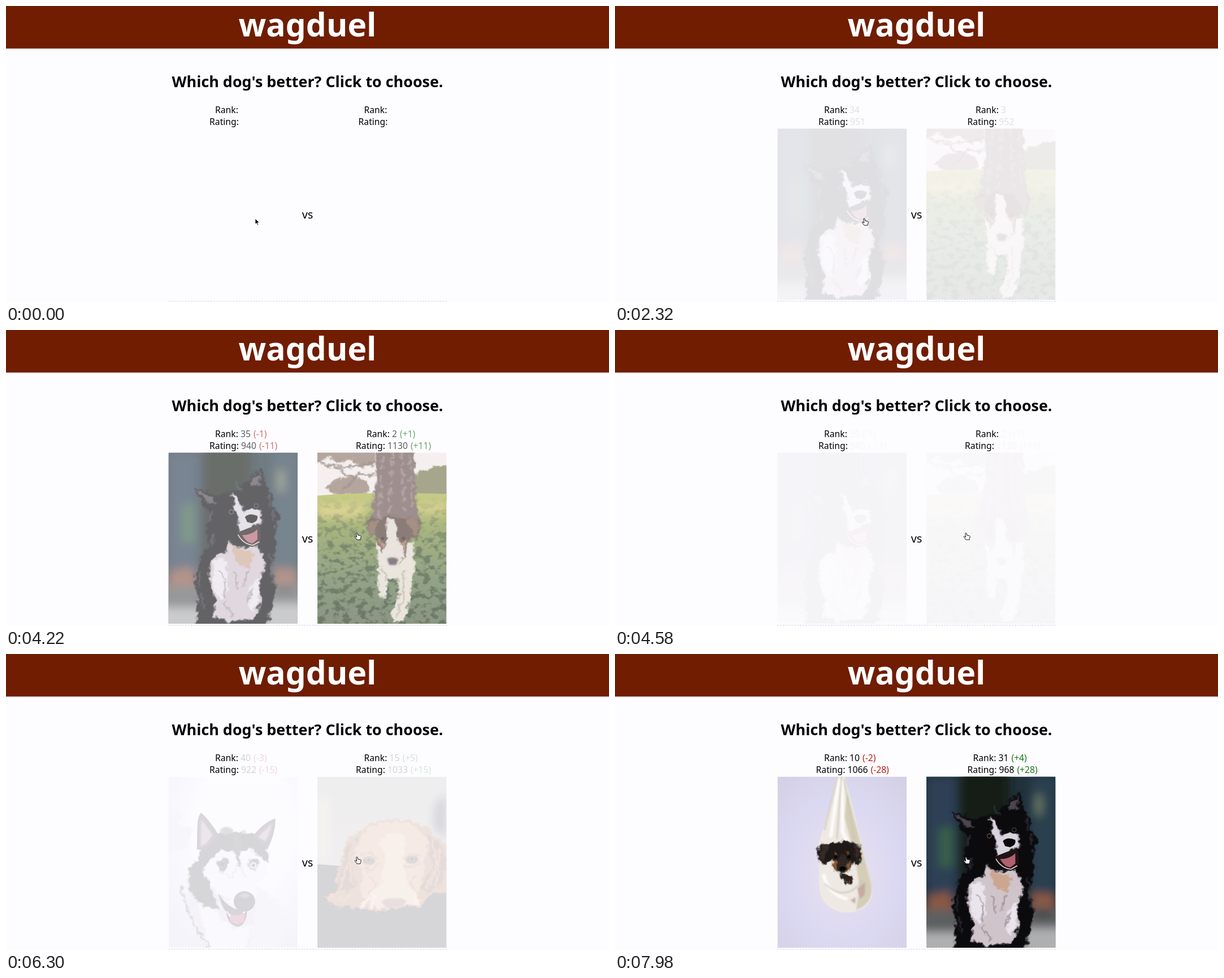
These frames come from a looping animation (1067 by 525 pixels, 8 s). An HTML page:

```html
<!DOCTYPE html>
<html lang="en">
<meta charset="utf-8">
<title>wagduel</title>
<style>
  html, body { margin: 0; width: 100%; height: 100%; overflow: hidden; background: #fdfcff }
  body > svg { display: block }
  text { font-family: "Noto Sans", "Open Sans", sans-serif; text-anchor: middle; white-space: pre }
  .info { font-size: 15.7px }
  .delta { text-anchor: start }
  .bold { font-weight: 700 }
  .blur { filter: url(#blur) }
  .soft { filter: url(#soft) }
  .fur { filter: url(#fur) }
  .line { fill: none; stroke-linecap: round; stroke-linejoin: round }
</style>
<svg id="stage" width="1067" height="525" viewBox="0 0 1067 525">
  <defs>
    <filter id="blur" x="-50%" y="-50%" width="200%" height="200%"><feGaussianBlur stdDeviation="8"/></filter>
    <filter id="soft" x="-20%" y="-20%" width="140%" height="140%"><feGaussianBlur stdDeviation="1.5"/></filter>
    <filter id="fur" color-interpolation-filters="sRGB">
      <feGaussianBlur in="SourceGraphic" stdDeviation=".8" result="shape"/>
      <feTurbulence type="fractalNoise" baseFrequency=".09" numOctaves="3" seed="4"/>
      <feDisplacementMap in="shape" scale="14" xChannelSelector="R" yChannelSelector="G"/>
    </filter>
    <filter id="leaves" x="0" y="0" width="100%" height="100%" color-interpolation-filters="sRGB">
      <feTurbulence type="fractalNoise" baseFrequency=".07 .1" numOctaves="3" seed="9"/>
      <feColorMatrix values="0 0 0 0 .09  0 0 0 0 .19  0 0 0 0 .06  6 0 0 0 -2.9"/>
      <feComposite in2="SourceGraphic" operator="in"/>
    </filter>
    <linearGradient id="wall"><stop stop-color="#dedad6"/><stop offset=".6" stop-color="#dddbee"/><stop offset="1" stop-color="#d9d6e2"/></linearGradient>
    <linearGradient id="table" x2="0" y2="1"><stop stop-color="#e6e3ec"/><stop offset="1" stop-color="#c9c2b2"/></linearGradient>
    <linearGradient id="grass" x2="0" y2="1"><stop stop-color="#a9b03f"/><stop offset=".3" stop-color="#748a36"/><stop offset=".65" stop-color="#577043"/><stop offset="1" stop-color="#4a5c3c"/></linearGradient>
    <linearGradient id="shade" x2="0" y2="1"><stop stop-color="#fff" stop-opacity="0"/><stop offset=".4" stop-color="#fff" stop-opacity=".7"/><stop offset="1" stop-color="#fff"/></linearGradient>
    <radialGradient id="snow" cx=".58" cy=".3" r=".75"><stop offset=".5" stop-color="#fcfcff"/><stop offset=".72" stop-color="#e6e6fa"/><stop offset="1" stop-color="#d2d2ea"/></radialGradient>
    <linearGradient id="room" x2="0" y2="1"><stop stop-color="#aaa9a4"/><stop offset="1" stop-color="#c0b3a8"/></linearGradient>
    <radialGradient id="studio" cy=".55" r=".7"><stop stop-color="#eae2ee"/><stop offset=".6" stop-color="#dbd8f2"/><stop offset="1" stop-color="#d4d1e6"/></radialGradient>

    <g id="pug">
      <path fill="url(#wall)" d="M0 0H228V303H0Z"/>
      <path class="line" stroke="#aaa795" stroke-width="3" d="M0 14H38V0"/>
      <path fill="#f3f1f8" d="M156 0h4V30h-4Z"/>
      <path class="soft" fill="#efedfb" d="M148 128 228 125V215H160Z"/>
      <path class="soft" fill="#b9aab8" d="M228 74Q215 95 215 124L228 125Z"/>
      <path fill="#17130f" d="M88 146Q90 130 106 128Q128 123 150 128Q170 130 180 142Q192 158 189 168L178 172Q184 190 201 207L104 196Q102 172 108 158L97 160Q94 150 88 146Z"/>
      <path class="soft" fill="#0a0807" d="M92 146 108 130 113 140 99 158ZM172 138 188 166 177 170 166 150Z"/>
      <ellipse class="soft" cx="138" cy="172" rx="17" ry="13" fill="#2f2722"/>
      <path class="line" stroke="#60554c" stroke-width="1.5" d="M120 183Q125 172 138 171Q152 172 156 183M129 143Q137 147 146 143"/>
      <path fill="#080706" d="M130 160Q138 156 146 160L140 167H135Z"/>
      <g fill="#4d4d61"><circle cx="119" cy="155" r="6"/><circle cx="157" cy="159" r="6"/></g>
      <g fill="#0a0909"><circle cx="119" cy="156" r="4"/><circle cx="157" cy="160" r="4"/></g>
      <g fill="#c3c4dc"><circle cx="117" cy="153" r="2"/><circle cx="155" cy="157" r="2"/></g>
      <path fill="url(#table)" d="M0 190Q110 190 228 212V303H0Z"/>
      <path class="blur" fill="#aaa18d" d="M0 285Q80 290 108 240Q106 295 30 303H0Z"/>
      <path fill="#3a1c0e" d="M0 197Q75 185 102 230L100 254Q84 288 20 291L0 289Z"/>
      <path fill="#a4602f" d="M0 196Q75 185 101 229Q100 266 30 272L0 268Z"/>
      <path fill="#e3bb8c" d="M0 200Q68 190 93 228Q90 258 30 264L0 260Z"/>
      <g class="line fur" stroke-width="13" stroke-dasharray="0 17">
        <path stroke="#f4ebdc" d="M8 212Q50 195 82 224T12 252M8 230H65"/>
        <path stroke="#d99358" stroke-width="7" d="M16 207Q58 200 80 234T8 244M20 222H68"/>
        <path stroke="#fff9f0" stroke-width="8" d="M5 223Q45 206 72 242M2 260H60"/>
      </g>
      <path fill="#83503d" d="M0 200 14 201 10 217 0 214Z"/>
    </g>

    <g id="wolf">
      <path fill="#f7f6ff" d="M0 0H228V303H0Z"/>
      <path class="soft" fill="#d3cfc9" d="M0 0H84L68 46 30 64H0Z"/>
      <path class="soft" fill="#c2a19a" d="M0 29 36 34 40 58 0 64Z"/>
      <path class="soft" fill="#d8d8ee" d="M145 49H228V57H145ZM0 207Q80 190 228 224V265Q110 235 0 250Z"/>
      <g class="fur">
        <path fill="#c2b9b1" d="M90 32 70 57 55 70 60 82 42 95 48 108 39 126 50 138 40 160 46 182 70 200H125V70Z"/>
        <path fill="#6c625d" d="M107 16 124 36Q140 31 160 24L153 52Q157 82 176 116Q179 127 166 134L142 137Q178 147 190 175L199 186 206 209 190 213 184 226 160 232 130 238 96 225 62 210 42 198 46 166 55 132 49 112 64 98 58 84 76 74 80 49Z"/>
        <path fill="#343032" d="M107 18 118 42 102 64 89 70 87 50ZM158 27 149 50 135 42ZM95 72 115 56 110 98 91 133 83 169 102 201 78 212 46 194 55 142 75 116ZM145 145 164 154 181 186 171 220 153 183Z"/>
        <path fill="#969096" d="M116 52Q134 45 149 65L154 82Q164 103 176 117L170 133 140 137Q113 118 106 82Z"/>
        <path fill="#cfc9cc" d="M112 102Q131 120 166 128L157 137 135 139 109 125Z"/>
        <path class="line" stroke="#575158" stroke-width="4" d="M120 63Q135 57 151 78M148 112Q161 121 173 122M96 148 123 161 116 193M139 159 148 182M64 185 89 200"/>
        <path class="line" stroke="#b4aaa5" stroke-width="4" d="M74 82 61 110 72 131M84 87 75 110M115 205 126 180M134 211 153 202M176 190 188 206"/>
        <path class="line" stroke="#862d36" stroke-width="4" stroke-dasharray="3 2" d="M63 163Q75 162 86 156"/>
        <path fill="#e2dde4" d="M51 213Q77 204 91 216L82 259 59 264 44 245ZM99 208Q128 190 148 209L142 235 115 238Z"/>
        <path fill="#f6f5ff" d="M-9 242 34 237 55 252 95 233 129 242 184 227 238 233V313H-9Z"/>
        <path class="line" stroke="#c1bdca" stroke-width="4" d="M57 245 64 258M76 237 72 260M112 224 125 236M14 213 44 226"/>
      </g>
      <path fill="#171417" d="M124 86Q131 80 138 88L130 91ZM164 121Q175 113 177 122Q174 130 166 129Z"/>
    </g>

    <g id="collie">
      <path fill="#20323b" d="M0 0H228V303H0Z"/>
      <g class="blur">
        <path fill="#2d4054" d="M0 0H52V230H0Z"/><path fill="#171c13" d="M60 -20H146V210H60Z"/>
        <path fill="#2c4150" d="M184 0H228V230H184Z"/><path fill="#38604a" d="M23 90H47V160H23Z"/><path fill="#6c7a62" d="M192 32H204V68H192Z"/>
        <path fill="#5d5f60" d="M-20 232H250V320H-20Z"/><path fill="#8b5944" d="M0 212 40 203 52 235H0ZM184 205 228 208V232H184Z"/>
        <path fill="#aeb0b0" d="M-20 275H60L75 320H-20ZM170 268H250V320H170Z"/><path fill="#27292a" d="M190 238H222V246H190Z"/>
      </g>
      <g class="fur">
        <path fill="#0b0b0e" d="M45 62Q68 66 84 77Q104 64 122 70Q128 54 140 50L163 26Q172 42 171 62Q186 72 184 92L197 111 188 132Q194 165 182 204L190 240 172 313H48L53 261 45 231Q50 188 72 165L66 137 76 112 64 95Z"/>
        <path fill="#4c454e" d="M50 66 78 78 84 90 68 88ZM160 33 164 54 150 60 144 54Z"/>
        <path class="line" stroke="#3a3b49" stroke-width="2" d="M119 54 129 68M77 104 72 122M177 74 181 96M188 102 184 119M80 143 76 165M58 208 53 234M179 180 185 230M58 250 61 277"/>
        <path fill="#d9d4de" d="M110 73Q121 75 126 90L133 105 Q146 97 158 103L166 113 164 127 144 134 132 145Q121 134 123 116Z"/>
        <path fill="#d0c4cb" d="M110 157Q118 170 128 166L158 166Q172 180 167 211L160 233 164 261 150 294 104 299 79 290 83 263 76 238 70 207Q80 176 100 178Z"/>
        <path fill="#e9e4ee" d="M80 188 102 190 106 240 92 262 78 231ZM141 240 159 224 159 269 145 283Z"/>
        <path fill="#cba792" d="M114 164 152 178 142 205 116 192Z"/>
        <path class="line" stroke="#8d7b80" stroke-width="2" d="M89 207 100 229 99 259M115 212 122 240M141 210 132 235M98 266 114 290M148 240 139 265"/>
      </g>
      <path fill="#201315" d="M120 142 140 134 160 127Q166 146 161 161L149 167Q131 165 120 142Z"/>
      <path fill="#b0606f" d="M130 146Q147 146 157 136L157 154 148 161Q138 160 130 146Z"/>
      <path class="line" stroke="#e9dfde" stroke-width="1.5" d="M123 146Q132 162 149 164L160 158"/>
      <path fill="#08080b" d="M135 114Q143 106 157 112Q159 121 148 125L139 123Z"/>
      <g fill="#5e4d40"><circle cx="111" cy="105" r="4.5"/><circle cx="155" cy="94" r="4"/></g>
      <g fill="#050507"><circle cx="111" cy="105" r="3"/><circle cx="155" cy="94" r="3"/></g>
    </g>

    <g id="puppy">
      <path fill="#f1eae6" d="M0 0H228V303H0Z"/>
      <g class="fur">
        <path fill="#8b7566" d="M-9 -9H104V20L80 28 62 12 36 20 19 8 -9 20ZM14 62 38 46 62 40 86 50 94 68 60 74 30 76Z"/>
        <path class="line" stroke="#705b50" stroke-width="3" d="M0 16Q50 34 104 15M30 24 67 46M43 67 75 38 100 39"/>
        <path fill="#75754c" d="M171 38 196 27 238 22V85H171Z"/>
      </g>
      <path fill="url(#grass)" d="M0 76Q80 69 228 73V303H0Z"/>
      <path class="blur" fill="#cabd57" d="M0 90H90L76 114H0ZM172 90H228V106H180Z"/>
      <mask id="depth"><path fill="url(#shade)" d="M0 76H228V303H0Z"/></mask>
      <g mask="url(#depth)"><path filter="url(#leaves)" d="M0 76H228V303H0Z"/></g>
      <g class="fur">
        <path fill="#65504c" d="M107 -9H171L174 74 180 123H95L101 64Z"/>
        <path class="line" stroke="#8b7170" stroke-width="5" stroke-dasharray="9 8 4 11" d="M115 8 108 118M133 0 127 109M148 0 154 111M164 9 168 102"/>
        <path fill="#e0dacb" d="M105 160 168 160Q173 190 168 225L165 250 153 297 134 300 129 288 144 252 142 222 124 226 122 256 109 255 108 222Z"/>
        <path class="line" stroke="#a99c86" stroke-width="3" d="M114 205 121 225M153 210 150 259 141 288"/>
        <path fill="#49332b" d="M112 117Q91 107 85 127L92 149 104 144 108 160 119 188 130 201 146 199 157 180 164 145 173 156 184 127Q176 107 154 116Q132 108 112 117Z"/>
        <path fill="#75503e" d="M110 117 101 143 92 146 87 126ZM157 116 172 150 181 128 173 114Z"/>
        <path fill="#e0d7cb" d="M122 117H138L138 142 147 164 154 182 142 203 124 202 113 184 122 160Z"/>
        <path fill="#a87050" d="M108 152 120 160 117 172ZM148 162 159 154 154 176Z"/>
      </g>
      <path class="soft" fill="#43363a" d="M123 188Q133 183 143 189L139 199H127Z"/>
      <g fill="#1d1412"><circle cx="115" cy="152" r="3"/><circle cx="152" cy="152" r="3"/></g>
    </g>

    <g id="husky">
      <path fill="url(#snow)" d="M0 0H228V303H0Z"/>
      <g class="fur">
        <path fill="#dedced" d="M-9 45 25 68 16 79 43 94 34 123 -9 145ZM155 193 190 218 207 252 188 313H137Z"/>
        <path fill="#cfccde" d="M46 150 32 188 36 218 20 193 32 239 48 263 60 313H144L148 259 157 216Z"/>
        <path fill="#19181b" d="M53 139Q62 108 90 101Q124 92 158 106Q178 122 176 152L157 150 145 129 125 130 124 159 99 165 84 162 72 181 76 204 92 236 70 232 48 218Q32 194 36 165Z"/>
        <path fill="#edecf8" d="M52 228 86 238 102 263 122 270 148 261 135 313H75Z"/>
        <path class="line" stroke="#3b393e" stroke-width="3" stroke-dasharray="22 5" d="M21 194 33 235 50 269 72 303"/>
      </g>
      <path fill="#28252a" d="M50 129 51 87Q52 68 58 64Q74 79 89 104L65 130ZM150 104Q170 80 189 74Q189 102 174 130Z"/>
      <path class="soft" fill="#a1838f" d="M58 76 78 103 67 118 57 124ZM183 83 177 102 171 114 158 107Z"/>
      <path class="soft" fill="#584c4a" d="M90 96Q101 82 116 96L102 104Z"/>
      <g class="fur">
        <path fill="#eeedf8" d="M72 150Q92 123 114 132L125 158 130 140Q142 125 157 136L173 153Q174 178 156 191L154 224 137 239 117 234 98 216 75 194 61 167Z"/>
        <path fill="#242125" d="M112 98H127L127 160 119 150ZM82 152Q94 139 106 146Q112 160 98 167Q86 166 82 152ZM142 150Q150 142 159 151Q159 167 148 168Q141 162 142 150Z"/>
        <path class="line" stroke="#6d666e" stroke-width="2" stroke-dasharray="1 4" d="M121 154 113 182M128 156 135 180M97 171 113 182M83 209 111 219M87 219 110 225"/>
      </g>
      <path fill="#211719" d="M88 205Q92 228 102 240Q104 262 123 266Q138 262 139 236L117 234Q98 226 88 205Z"/>
      <path fill="#a23a50" d="M105 242Q120 250 135 240L133 257 122 262 110 257Z"/>
      <path class="line" stroke="#fff" stroke-width="2" d="M103 239 109 247M132 241 136 238"/>
      <ellipse cx="134" cy="221" rx="19" ry="18" fill="#17181c"/><path class="soft" fill="#56545c" d="M124 211Q134 202 145 211L137 216Z"/>
      <circle cx="95" cy="155" r="5" fill="#59443c"/><circle cx="95" cy="155" r="4" fill="#08090c"/>
      <circle cx="150" cy="157" r="6" fill="#9cc4dd"/><circle cx="150" cy="157" r="2.5" fill="#08090c"/>
    </g>

    <g id="spaniel">
      <path fill="url(#room)" d="M0 0H228V303H0Z"/>
      <path class="blur" fill="#d5cfaa" d="M0 39H19V146H0Z"/><path class="blur" fill="#17203a" d="M228 28 207 50 204 87 228 112Z"/>
      <path fill="#181619" d="M0 155 49 159 70 196 189 210 228 183V303H0Z"/>
      <g class="fur">
        <path fill="#a8673a" d="M76 95Q102 72 142 76Q190 77 209 106L238 128V206L201 207 182 231 151 228 111 237 73 235 57 229 35 233 12 214 39 199 31 185 42 151 52 111Z"/>
        <path fill="#cf9360" d="M79 98Q105 79 139 80Q181 82 193 113L189 152 184 196 171 221 97 232 75 207 80 169 66 140Z"/>
        <path fill="#e1b78d" d="M127 99Q145 98 158 116L151 151 162 193 183 219 168 230 106 234 89 212 112 188 119 140 105 117Z"/>
        <path fill="#713f25" d="M76 108Q47 112 44 157L34 192 49 206 68 190 60 153ZM194 103Q225 116 226 148L222 188 191 206 179 197 203 163Z"/>
        <path class="line" stroke="#c07b45" stroke-width="4" d="M64 114 51 161 42 194M70 117 58 160 62 187M204 112 211 155 195 197M216 128 215 171 207 194M19 215 37 204M40 220 63 209"/>
        <path class="line" stroke="#9c623a" stroke-width="3" d="M77 140Q91 130 106 145M152 144Q166 132 182 143M82 162Q91 170 109 157M152 157Q169 167 182 151M93 177 103 187 93 208M172 174 164 191 175 209"/>
        <path class="line" stroke="#edcca6" stroke-width="5" d="M101 210 95 231M89 217 77 231M172 211 177 225"/>
      </g>
      <g class="soft" fill="#3b2419"><ellipse cx="91" cy="149" rx="11" ry="7"/><ellipse cx="167" cy="147" rx="11" ry="7"/></g>
      <g fill="#7d4d2e"><circle cx="91" cy="148" r="5"/><circle cx="167" cy="146" r="5"/></g>
      <g fill="#0d0b0c"><circle cx="91" cy="148" r="3"/><circle cx="167" cy="146" r="3"/></g>
      <path class="soft" fill="#8b524b" d="M113 222Q119 214 135 216Q153 213 157 222L148 231 122 233Z"/>
    </g>

    <g id="dachshund">
      <path fill="url(#studio)" d="M0 0H228V303H0Z"/>
      <path fill="#eee9e3" d="M104 0H119L136 65 151 129 166 190Q174 222 147 235Q112 250 86 226Q70 212 74 168L72 121 91 58Z"/>
      <path class="soft" fill="#d4cdb7" d="M123 27 150 130 166 192Q170 225 139 236L145 196 136 137 118 72Z"/>
      <path class="line soft" stroke="#fdfbfa" stroke-width="6" d="M109 5 94 105M114 9 115 98 125 118M82 175Q88 206 121 216"/>
      <path class="line soft" stroke="#cbc3b4" stroke-width="2" d="M106 0 83 94M113 0 105 110M118 6 137 119M84 190Q120 224 150 184"/>
      <path class="soft" fill="#c5aba3" d="M141 198 155 187 154 209 146 216ZM129 219 138 214 137 225Z"/>
      <g class="fur">
        <path fill="#1e1817" d="M91 119Q77 112 71 129Q70 150 82 155L94 145 100 165 113 173 128 164 134 152 141 159Q151 148 146 128Q140 111 127 117Q109 111 91 119Z"/>
        <path fill="#362a26" d="M80 117 90 121 82 149 74 145ZM136 116 144 126 142 153 134 140Z"/>
        <path fill="#8a5a36" d="M94 148 107 152 112 165 103 168ZM121 154 130 148 128 163 118 169ZM101 134 107 133 106 138ZM121 133 127 133 125 137Z"/>
        <path fill="#302622" d="M108 140H121L124 164 114 171 107 163Z"/>
        <path fill="#2b211d" d="M109 175Q123 167 134 181L131 191 119 190Z"/>
      </g>
      <g fill="#070606"><circle cx="103" cy="142" r="3"/><circle cx="126" cy="142" r="3"/><ellipse cx="115" cy="163" rx="6" ry="4"/></g>
      <path class="line" stroke="#7d634f" d="M121 185 122 189M127 184 128 189M132 182 132 187"/>
    </g>
  </defs>

  <path fill="#fdfcff" d="M0 0H1067V525H0Z"/>
  <path fill="#701d02" d="M0 0H1067V75.5H0Z"/>
  <text class="bold" x="533.5" y="54" font-size="57" fill="#fff">wagduel</text>
  <text class="bold" x="533.5" y="144" font-size="26.9">Which dog's better? Click to choose.</text>
  <text x="533.5" y="377" font-size="20">vs</text>
  <path stroke="#d9d8ec" stroke-dasharray="3 2" d="M287 523.5H780"/>
  <g id="sides"></g>
  <g id="cursor" stroke="#000" stroke-linejoin="round">
    <path id="arrow" stroke="#fff" stroke-width=".8" d="M0 0V10L2.3 7.9 4 11.7 5.7 11 4 7.3H7.2Z"/>
    <path id="hand" fill="#fff" stroke-width=".9" d="M-1.2 .5Q0-.8 1 .7L2 4.3Q3 3.3 4 4.7Q5 3.9 6 5.2Q7.2 4.8 7.3 6.5L6.5 9.5 6 12H0L-3.5 7.4Q-4.3 5.5-2.4 6L-.3 7.8Z"/>
  </g>
</svg>
<script>
const LOOP = 8000, FADE = 600, DELTA_FADE = 300;
const $ = id => document.getElementById(id);
const clamp = v => Math.max(0, Math.min(1, v));

// Each dog: photo, final rank, rank change, final rating, rating change.
const rounds = [
  { start: 40, click: 1040, leave: 1640, dogs: [['pug', 25, 6, 985, 21], ['wolf', 33, -5, 952, -21]] },
  { start: 2250, click: 3400, leave: 4000, dogs: [['collie', 35, -1, 940, -11], ['puppy', 2, 1, 1130, 11]] },
  { start: 4600, click: 5150, leave: 5800, dogs: [['husky', 40, -3, 922, -15], ['spaniel', 15, 5, 1033, 15]] },
  { start: 6400, click: 7450, leave: 8050, dogs: [['dachshund', 10, -2, 1066, -28], ['collie', 31, 4, 968, 28]] },
];

const row = (label, x, y) =>
  `<text class="info" x="${x}" y="${y}">${label}: <tspan></tspan></text><text class="info delta" y="${y}"></text>`;

const sides = [287.5, 551].map(x => {
  const group = document.createElementNS('http://www.w3.org/2000/svg', 'g');
  const center = x + 114;
  group.innerHTML = row('Rank', center, 190) + row('Rating', center, 211) +
    `<svg x="${x}" y="217.5" width="228.5" height="303.5" viewBox="0 0 228 303" preserveAspectRatio="none"><use/></svg>`;
  $('sides').append(group);
  const texts = group.querySelectorAll('text');
  return {
    center, photo: group.querySelector('svg'), use: group.querySelector('use'),
    rows: [[texts[0], texts[1]], [texts[2], texts[3]]],
  };
});

function drawRow([text, delta], center, value, change, opacity, deltaOpacity) {
  const number = text.querySelector('tspan');
  number.textContent = value;
  number.setAttribute('fill-opacity', opacity);
  delta.textContent = `(${change > 0 ? '+' : ''}${change})`;
  delta.setAttribute('x', center + text.getComputedTextLength() / 2 + 5);
  delta.setAttribute('fill', change > 0 ? '#18751b' : '#b91c14');
  delta.setAttribute('fill-opacity', opacity * deltaOpacity);
}

function drawCursor(t) {
  const p = clamp((t - 2700) / 600), ease = p * p * (3 - 2 * p);
  const x = 441 + 180 * ease, y = 377 - 17 * ease;
  const pointing = t > 120 && (x < 516 || x > 551);
  $('cursor').setAttribute('transform', `translate(${x} ${y})`);
  $('hand').style.display = pointing ? '' : 'none';
  $('arrow').style.display = pointing ? 'none' : '';
}

function draw(t) {
  const index = Math.max(0, rounds.findLastIndex(r => t >= r.start));
  const { start, click, leave, dogs } = rounds[index];
  const opacity = Math.min(clamp((t - start) / FADE), clamp(1 - (t - leave) / FADE));
  const deltaOpacity = clamp((t - click) / DELTA_FADE);
  sides.forEach((side, i) => {
    let [photo, rank, rise, rating, gain] = dogs[i];
    if (t < click) { rank += rise; rating -= gain; }
    // The right-hand rating is refreshed slightly late.
    if (i && index && t < start + 100) rating = rounds[index - 1].dogs[i][3];
    const href = '#' + photo;
    if (side.use.getAttribute('href') !== href) side.use.setAttribute('href', href);
    side.photo.setAttribute('opacity', opacity);
    drawRow(side.rows[0], side.center, rank, rise, opacity, deltaOpacity);
    drawRow(side.rows[1], side.center, rating, gain, opacity, deltaOpacity);
  });
  drawCursor(t);
}

const begin = performance.now();
function tick() {
  draw((performance.now() - begin) % LOOP);
  requestAnimationFrame(tick);
}
tick();
</script>
</html>
```
